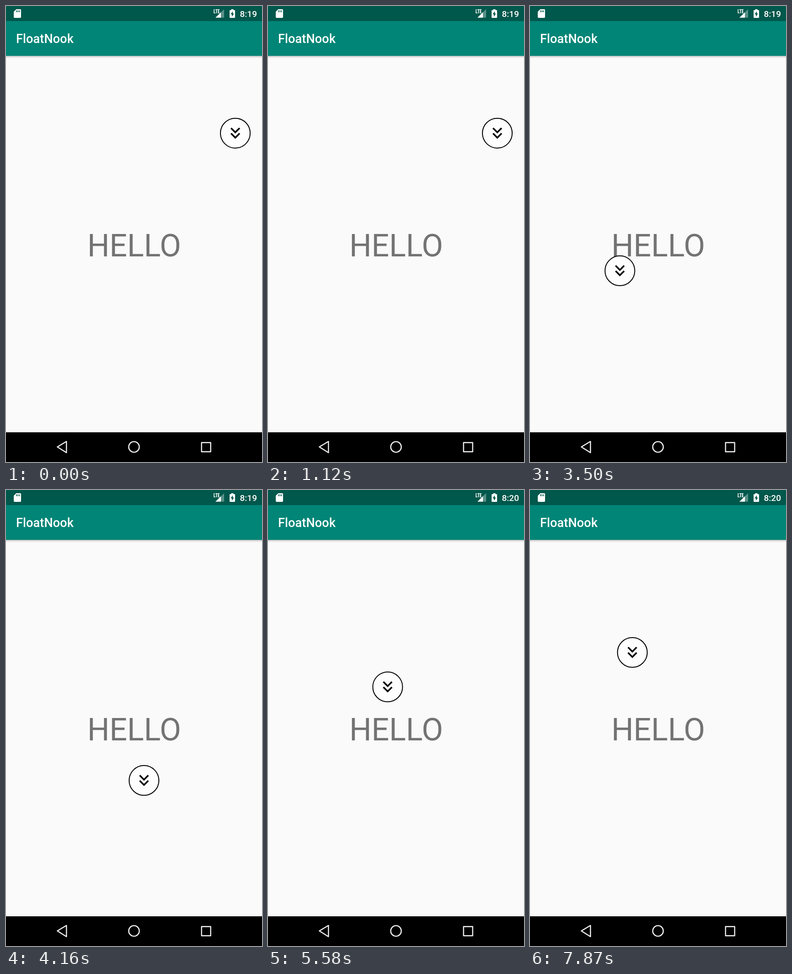
Recreate the animation shown at these times as an HTML page. Size 561x998 px, loop 8 s.

```html
<!DOCTYPE html>
<html lang="en">
<head>
<meta charset="utf-8">
<title>Floating button</title>
<style>
  html, body { margin: 0; width: 100%; height: 100%; overflow: hidden; background: #fafafa; }
  svg { display: block; width: 100%; height: 100%; }
  text { font-family: Roboto, sans-serif; }
</style>
</head>
<body>
<svg viewBox="0 0 561 998">
  <defs>
    <linearGradient id="shade" x2="0" y2="1">
      <stop offset="0" stop-color="#000" stop-opacity=".3"/>
      <stop offset=".4" stop-color="#000" stop-opacity=".1"/>
      <stop offset="1" stop-color="#000" stop-opacity="0"/>
    </linearGradient>
  </defs>
  <rect width="561" height="998" fill="#fafafa"/>

  <!-- app bar -->
  <rect y="109" width="561" height="6" fill="url(#shade)"/>
  <rect y="33" width="561" height="76" fill="#008577"/>
  <text x="22" y="81" font-size="27.3" font-weight="500" fill="#fff">FloatNook</text>

  <!-- status bar -->
  <rect width="561" height="33" fill="#00574b"/>
  <g fill="#fff">
    <path d="M22.5 7H31q2 0 2 2v15q0 2-2 2H19q-2 0-2-2V12.5Z"/>
    <path d="M23 9.5v4M26.3 9.5v4M29.6 9.5v4" stroke="#00574b" stroke-width="1.7"/>
    <path d="M478 7v18.5h-19Z" opacity=".35"/>
    <path d="M471 13.8v11.7h-12Z"/>
    <path d="M456 7v8.2h3M458.8 7.8h5M461.3 7.8v8.2M468 7.8h-2.8v7.4h2.8M465.2 11.5h2.5" fill="none" stroke="#fff" stroke-width="1.6"/>
    <path d="M493.5 9V7h5v2h2.2q1.3 0 1.3 1.3v14.4q0 1.3-1.3 1.3h-9.4q-1.3 0-1.3-1.3V10.300q0-1.300 1.300-1.300Z"/>
    <path d="M497 11.500v5h2.700L495 23.500v-5.200h-2.700Z" fill="#00574b"/>
    <text id="clock" x="550" y="24" font-size="19.1" font-weight="500" text-anchor="end">8:19</text>
  </g>

  <text x="281" y="548" font-size="68.2" fill="#737373" text-anchor="middle">HELLO</text>

  <g id="button">
    <circle r="32.6" fill="#fefefe" stroke="#000" stroke-width="2"/>
    <path transform="scale(1.77) translate(-12 -12)" d="M18 6.410 16.590 5 12 9.580 7.410 5 6 6.410l6 6zM18 13l-1.410-1.410L12 16.170l-4.590-4.580L6 13l6 6z"/>
  </g>

  <!-- navigation bar -->
  <rect y="933" width="561" height="65"/>
  <g fill="none" stroke="#f2f2f2" stroke-width="2.4" stroke-linejoin="round">
    <path d="M112.500 965 132.500 953v24.500Z"/>
    <circle cx="280.500" cy="965" r="11.600"/>
    <rect x="428.500" y="955.500" width="20" height="20"/>
  </g>
</svg>
<script>
  const LOOP = 8000, MINUTE_TURNS = 5300;
  const button = document.getElementById("button");
  const clock = document.getElementById("clock");

  // drag path: time, x, y
  const path = [
    [2540, 502.5, 278.3],
    [2830, 165.7, 450.3],
    [4160, 302.3, 635.7],
    [5000, 393.2, 465.3],
    [5580, 262.3, 431],
    [7870, 224.3, 355.5]
  ];

  function speed(i, axis) {
    const a = path[i - 1], b = path[i + 1];
    return a && b ? (b[axis] - a[axis]) / (b[0] - a[0]) : 0;
  }

  function place(t, axis) {
    const last = path.length - 1;
    if (t <= path[0][0]) return path[0][axis];
    if (t >= path[last][0]) return path[last][axis];
    const i = path.findIndex(p => p[0] > t) - 1;
    const a = path[i], b = path[i + 1], span = b[0] - a[0];
    const u = (t - a[0]) / span, v = 1 - u;
    return a[axis] * v * v * (1 + 2 * u) + b[axis] * u * u * (1 + 2 * v)
      + span * u * v * (speed(i, axis) * v - speed(i + 1, axis) * u);
  }

  function draw(t) {
    button.setAttribute("transform", `translate(${place(t, 1)} ${place(t, 2)})`);
    clock.textContent = t < MINUTE_TURNS ? "8:19" : "8:20";
  }

  const start = performance.now();
  function tick() {
    draw((performance.now() - start) % LOOP);
    requestAnimationFrame(tick);
  }
  tick();
</script>
</body>
</html>
```
